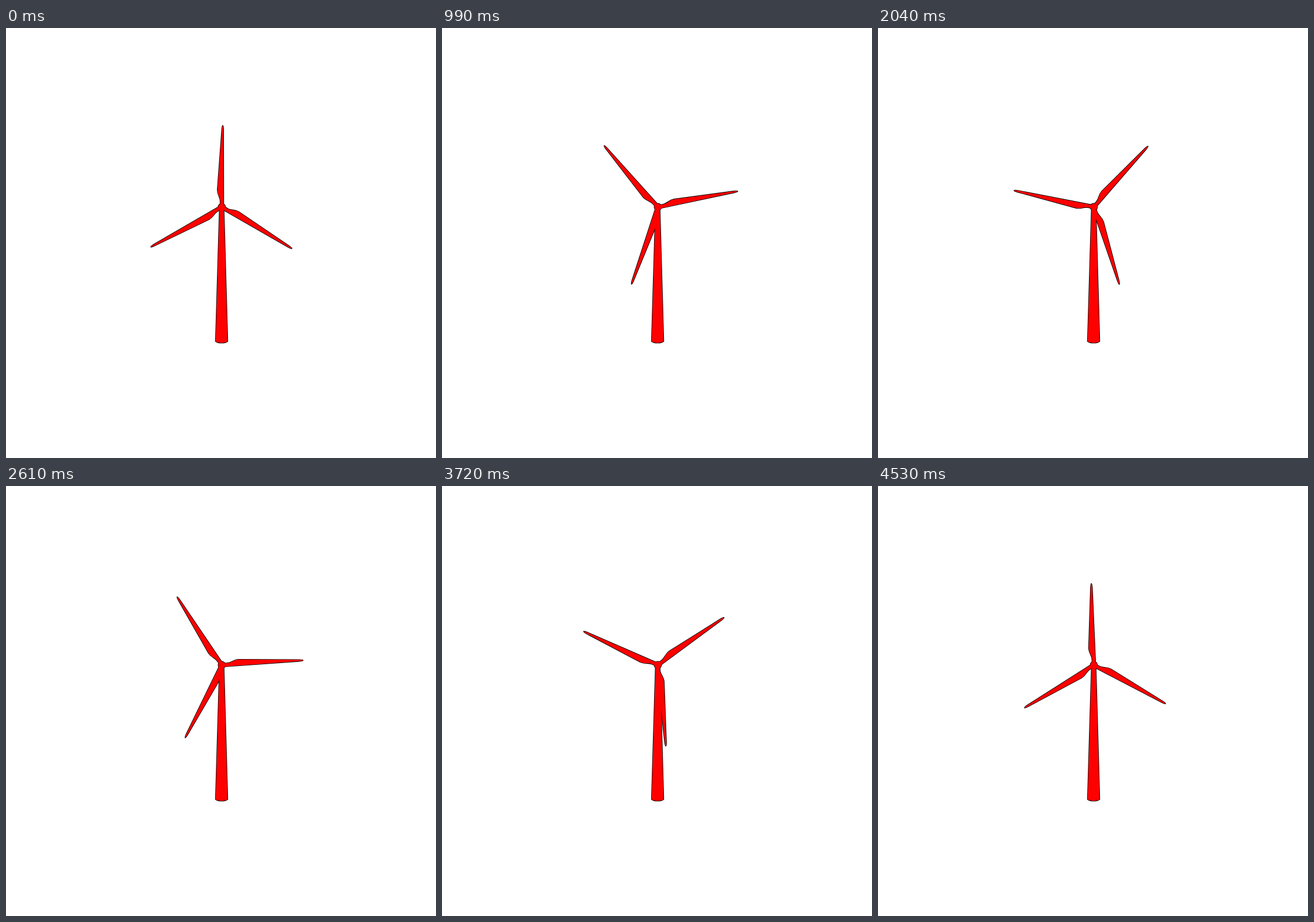
Animation, 748 px wide and 748 px high, one loop 4560 ms. Source, as an HTML page:

```html
<!DOCTYPE html>
<html lang="en">
<head>
<meta charset="utf-8">
<title>Wind turbine</title>
<style>
  html, body { margin: 0; height: 100%; overflow: hidden; background: #fff; }
  svg { display: block; width: 100%; height: 100%; }
</style>
</head>
<body>
<svg viewBox="0 0 748 748">
  <defs>
    <path id="blade" d="M-2.6 -3 V-10 C-2.4 -17 -7.6 -21 -7.5 -30 L.2 -135 Q.8 -141.5 1.6 -141.5 Q2.6 -141 2.7 -134 L3 -3 Z"/>
    <g id="turbine">
      <path d="M371.6 312 H378.8 L385.4 545 Q382 547.7 375 547.7 Q368 547.7 364.7 545 Z"/>
      <g id="rotor">
        <circle r="6"/>
        <use href="#blade"/>
        <use href="#blade" transform="rotate(120)"/>
        <use href="#blade" transform="rotate(240)"/>
      </g>
    </g>
  </defs>
  <!-- Fills cover the inner half of every stroke, leaving one merged outline -->
  <use href="#turbine" stroke="#000" stroke-width="1.8" stroke-linejoin="round"/>
  <use href="#turbine" fill="#f00"/>
</svg>
<script>
  const LOOP = 4560, STEP = 30;
  const rotor = document.getElementById('rotor');

  function draw(now) {
    const time = Math.floor((now % LOOP) / STEP) * STEP;
    rotor.setAttribute('transform', `translate(375.4 311.4) rotate(${360 * time / LOOP})`);
    requestAnimationFrame(draw);
  }
  draw(0);
</script>
</body>
</html>
```
